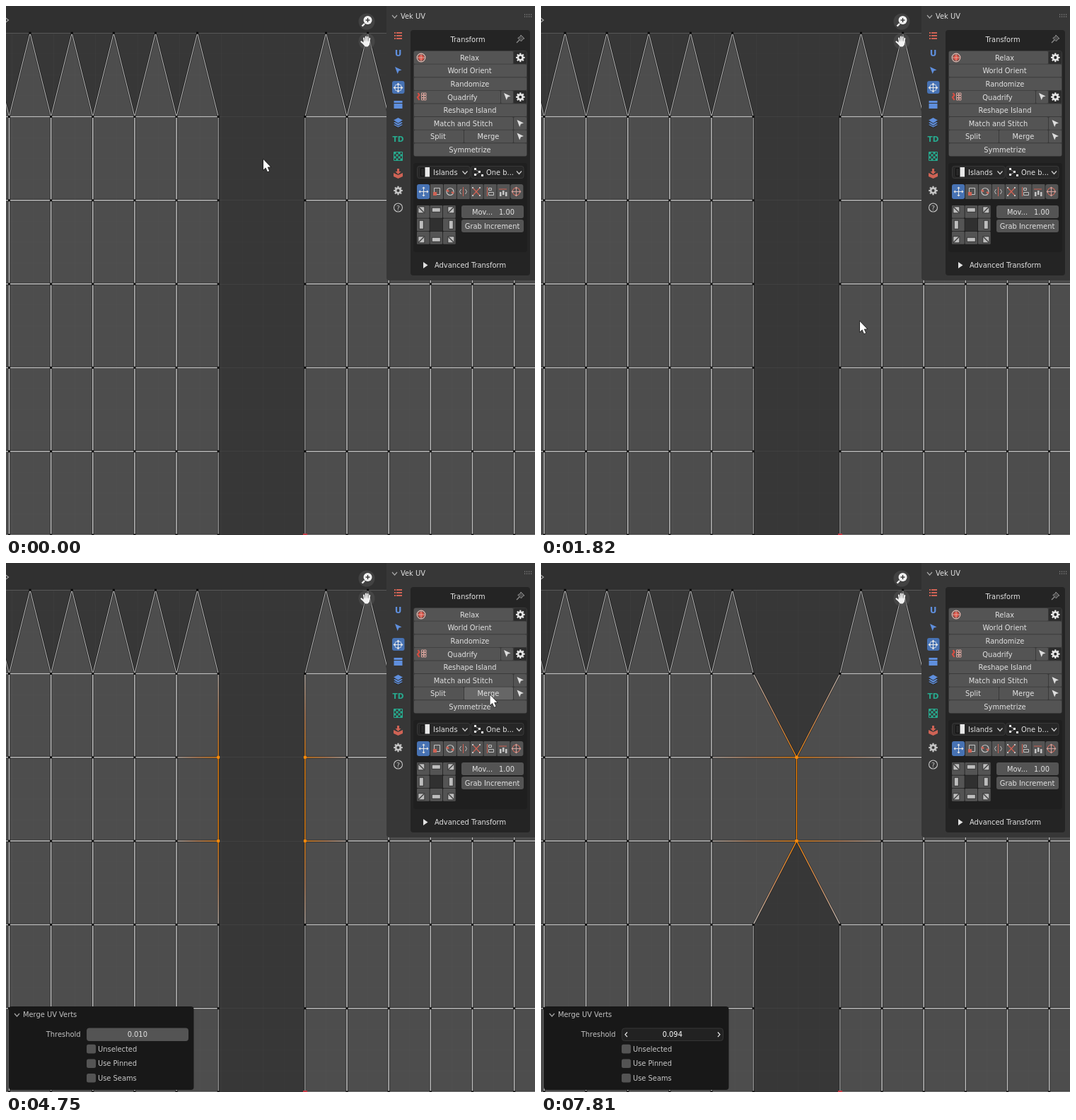
An HTML page with a canvas for the animation above (8000 ms loop, 748 by 748 pixels).

```html
<!DOCTYPE html>
<html lang="en">
<head>
<meta charset="utf-8">
<title>Merging UV vertices</title>
<style>
html, body { margin: 0; width: 100%; height: 100%; overflow: hidden; background: #303030; }
canvas { display: block; width: 748px; height: 748px; }
</style>
</head>
<body>
<canvas id="stage" width="748" height="748"></canvas>
<script>
const ctx = document.getElementById('stage').getContext('2d');
const LOOP = 8000, TICK = 76.667;
const GREY = '#545454', HOVER = '#666666', BLUE = '#4772b3', TEXT = '#e2e2e2';
const ICON = '#c4c4c4', RED = '#cf6355', SKY = '#5f8fdd', TEAL = '#27ab8f', ORANGE = '#ff8c0a';

// Pointer keys: tick, x, y
const PATH = [
  [1, 364, 217], [3, 347, 243], [5, 315, 272], [7, 284, 265], [9, 269.5, 244], [12, 269.5, 244],
  [14, 301, 292], [16, 353, 363], [18, 399.5, 415], [20, 431, 438], [22, 443, 443],
  [24, 451, 446], [36, 451, 446], [37, 465.5, 409.5], [39, 514, 352], [41, 590, 264],
  [43, 638, 206], [45, 655.5, 185], [47, 670, 184.5], [49, 684, 184.5], [61, 684, 185],
  [62, 684.5, 186.5], [64, 627, 250], [66, 475, 418], [68, 349, 542], [69, 329, 560],
  [71, 329, 560], [73, 296, 590], [75, 236, 636], [77, 195, 659], [80, 186, 666]
];

function pointerAt(tick) {
  if (tick <= PATH[0][0]) return PATH[0].slice(1);
  for (let i = 1; i < PATH.length; i++) {
    const [t1, x1, y1] = PATH[i], [t0, x0, y0] = PATH[i - 1];
    if (tick <= t1) {
      const p = (tick - t0) / (t1 - t0);
      return [x0 + (x1 - x0) * p, y0 + (y1 - y0) * p];
    }
  }
  return PATH[PATH.length - 1].slice(1);
}

function rect(x, y, w, h, color, r = 0) {
  ctx.fillStyle = color;
  ctx.beginPath();
  ctx.roundRect(x, y, w, h, r);
  ctx.fill();
}
function frame(x, y, w, h, color, r = 0) {
  ctx.strokeStyle = color;
  ctx.lineWidth = 1;
  ctx.beginPath();
  ctx.roundRect(x, y, w, h, r);
  ctx.stroke();
}
function trace(pts) {
  ctx.beginPath();
  for (let i = 0; i < pts.length; i += 2) ctx.lineTo(pts[i], pts[i + 1]);
}
function line(pts, color, width = 1) {
  trace(pts);
  ctx.strokeStyle = color;
  ctx.lineWidth = width;
  ctx.stroke();
}
function poly(pts, color) {
  trace(pts);
  ctx.fillStyle = color;
  ctx.fill();
}
function disc(x, y, r, color) {
  ctx.beginPath();
  ctx.arc(x, y, r, 0, 7);
  ctx.fillStyle = color;
  ctx.fill();
}
function ring(x, y, r, color, width = 1) {
  ctx.beginPath();
  ctx.arc(x, y, r, 0, 7);
  ctx.strokeStyle = color;
  ctx.lineWidth = width;
  ctx.stroke();
}
function label(text, x, y, align = 'center', color = TEXT, font = '9.9px') {
  ctx.font = font + ' "DejaVu Sans", sans-serif';
  ctx.textAlign = align;
  ctx.fillStyle = color;
  ctx.fillText(text, x, y);
}
function at(x, y, draw) {
  ctx.save();
  ctx.translate(x, y);
  draw();
  ctx.restore();
}
const chevron = (x, y, color = '#a5a5a5') => line([x - 3.5, y - 2, x, y + 2, x + 3.5, y - 2], color, 1.2);

// --- UV mesh ---
const COL = 59.15, ROW = 118.3, TOP = 38.2, COLS = 6, LAST = 5;
const snap = v => Math.floor(v) + 0.5;

function backdrop() {
  rect(0, 0, 748, 748, '#303030');
  rect(0, 38, 748, 710, '#373737');
  for (let i = 0; i < 26; i++) {
    const x = snap(8.5 + i * 29.6), y = snap(TOP + i * ROW / 4);
    line([x, 38, x, 748], `rgba(255,255,255,${i % 2 ? 0.012 : 0.025})`);
    line([0, y, 748, y], `rgba(255,255,255,${i % 4 ? 0.012 : 0.045})`);
  }
  line([0, 38.5, 748, 38.5], '#575757');
}

function island(inner, dir, selected, merged) {
  const vert = (i, r) => {
    const active = i === 0 && (r === 1 || r === 2);
    return { x: active && merged ? 361.5 : inner + dir * i * COL, y: TOP + (r + 1) * ROW, sel: active && selected };
  };
  const outline = [], edges = [], dots = [];
  const addEdge = (a, b, width) => edges.push({ a, b, width });
  for (let r = LAST; r >= 0; r--) { const v = vert(0, r); outline.push(v.x, v.y); }
  for (let i = 0; i < COLS; i++) {
    const tip = { x: inner + dir * (i + 0.5) * COL, y: TOP }, base = vert(i + 1, 0);
    outline.push(tip.x, tip.y, base.x, base.y);
    addEdge(vert(i, 0), tip, 1);
    addEdge(tip, base, 1);
    dots.push(tip);
  }
  outline.push(vert(COLS, LAST).x, 748);
  poly(outline, 'rgba(255,255,255,0.108)');

  // Edges shared by two faces are drawn heavier.
  for (let r = 0; r <= LAST; r++) {
    for (let i = 0; i <= COLS; i++) {
      if (i < COLS) addEdge(vert(i, r), vert(i + 1, r), r < LAST ? 1.5 : 1);
      if (r < LAST) addEdge(vert(i, r), vert(i, r + 1), i ? 1.5 : 1);
      dots.push(vert(i, r));
    }
  }
  for (const { a, b, width } of edges) line([a.x, a.y, b.x, b.y], 'rgba(0,0,0,0.4)', width + 1.7);
  for (const { a, b, width } of edges) {
    let color = '#bebebe';
    if (a.sel || b.sel) {
      color = ctx.createLinearGradient(a.x, a.y, b.x, b.y);
      color.addColorStop(0, a.sel ? ORANGE : '#c6c0bc');
      if (a.sel !== b.sel) color.addColorStop(0.5, '#d9935f');
      color.addColorStop(1, b.sel ? ORANGE : '#c6c0bc');
    }
    line([a.x, a.y, b.x, b.y], color, a.sel || b.sel ? 1.2 : width);
  }
  for (const v of dots) {
    const s = v.sel ? 4 : 3;
    rect(v.x - s / 2, v.y - s / 2, s, s, v.sel ? ORANGE : '#080808', v.sel ? 1 : 0);
  }
}

function viewButtons() {
  line([-1, 16.5, 3.5, 20, -1, 23.5], '#a8a8a8', 1.2);
  disc(510, 22, 11.5, 'rgba(84,84,84,0.5)');
  line([507, 25, 503.5, 28.5], '#f2f2f2', 2.4);
  disc(511.5, 20, 6, '#f2f2f2');
  line([508.5, 20, 514.5, 20], '#333', 1.4);
  line([511.5, 17, 511.5, 23], '#333', 1.4);
  disc(510, 50, 11.5, 'rgba(84,84,84,0.5)');
  ctx.lineCap = 'round';
  for (const [x, y] of [[506, 45.5], [508.8, 43.6], [511.6, 44], [514.3, 46]]) line([x, y, x * 0.7 + 153, 52], '#f2f2f2', 2);
  line([502.5, 50.5, 507, 54.5], '#f2f2f2', 2.2);
  ctx.lineCap = 'butt';
  poly([505.5, 50, 514.8, 50, 513.8, 55, 511.5, 57.5, 508, 57.5, 505, 54], '#f2f2f2');
}

// --- icons ---
function gear(x, y, color = '#e6e6e6') {
  ring(x, y, 3.4, color, 2.7);
  for (let i = 0; i < 8; i++) {
    const c = Math.cos(i * Math.PI / 4), s = Math.sin(i * Math.PI / 4);
    line([x + c * 4, y + s * 4, x + c * 6.3, y + s * 6.3], color, 2.2);
  }
}
function pick(x, y, color = '#dedede') {
  poly([x - 4.5, y - 5, x + 5, y - 0.5, x + 1, y + 0.8, x - 0.8, y + 5], color);
}
function moveCross(x, y, color = '#e4e4e4') {
  line([x - 6, y, x + 6, y], color);
  line([x, y - 6, x, y + 6], color);
  for (let i = 0; i < 4; i++) at(x, y, () => {
    ctx.rotate(i * Math.PI / 2);
    poly([7, 0, 4.5, -2.2, 4.5, 2.2], color);
  });
}

function tabs() {
  for (const y of [38, 42, 46]) {
    rect(549, y - 1, 2, 2, RED);
    rect(552, y - 1, 8, 2, RED);
  }
  label('U', 554.5, 71, 'center', SKY, 'bold 12px');
  pick(554.5, 91, SKY);
  rect(546, 106, 17.5, 18, BLUE, 3);
  frame(550.5, 111.5, 8, 8, '#a9bedd');
  moveCross(554.5, 115.5);
  rect(548.5, 134, 12, 3, SKY);
  rect(548.5, 138, 12, 7, SKY);
  for (const y of [168, 165, 161.5]) {
    poly([548, y, 554.5, y - 3.5, 561, y, 554.5, y + 3.5], SKY);
    line([548, y + 1, 554.5, y + 4.5, 561, y + 1], '#2d2d2d');
  }
  label('TD', 554.5, 192, 'center', TEAL, 'bold 10.5px');
  frame(548.5, 206.5, 12, 12, TEAL);
  for (let i = 0; i < 16; i++)
    if ((i + (i >> 2)) % 2 === 0) rect(548.5 + i % 4 * 3, 206.5 + (i >> 2) * 3, 3, 3, TEAL);
  poly([548, 236, 554.5, 239, 561, 236, 561, 241, 554.5, 244, 548, 241], RED);
  rect(553, 230, 3, 5, RED);
  poly([550.5, 234, 558.5, 234, 554.5, 238], RED);
  gear(554.5, 261, ICON);
  ring(554.5, 285, 6, ICON, 1.1);
  label('?', 554.5, 288.6, 'center', ICON, '9.5px');
}

// --- side panel ---
const rowTop = i => 64 + i * 18.6;
function button(x0, x1, row, text, textX, color = GREY) {
  rect(x0, rowTop(row), x1 - x0, 17.7, color, 1.5);
  if (text) label(text, textX, rowTop(row) + 12.8);
}

function operators(hover, pressed) {
  const tint = name => pressed === name ? BLUE : hover === name ? HOVER : GREY;
  rect(576, 63, 161, 150, '#3a3a3a', 4);
  button(577, 717, 0, 'Relax', 655.5);
  button(577, 736, 1, 'World Orient', 655.5);
  button(577, 736, 2, 'Randomize', 656);
  button(577, 699, 3, 'Quadrify', 645.5);
  button(577, 736, 4, 'Reshape Island', 656);
  button(577, 717, 5, 'Match and Stitch', 646.5);
  button(577, 647, 6, 'Split', 611);
  button(648, 717, 6, 'Merge', 682, tint('merge'));
  button(577, 736, 7, 'Symmetrize', 656, tint('symmetrize'));
  for (const r of [0, 3]) {
    button(718, 736, r, '', 0, '#2c2c2c');
    gear(727.3, rowTop(r) + 8.9);
  }
  for (const r of [5, 6]) button(718, 736, r);
  button(700, 717, 3);
  for (const [x, y] of [[708.5, 128], [727, 166], [727, 184.5]]) pick(x, y);
  ring(587, 73, 5.8, '#e9b9b0', 1.2);
  disc(587, 73, 4.2, '#d54d41');
  line([582, 73, 592, 73], '#e9b9b0', 0.8);
  line([587, 68, 587, 78], '#e9b9b0', 0.8);
  line([582.5, 123, 584.5, 126, 582, 129, 584.5, 133], '#d54d41', 2.2);
  for (let i = 0; i < 6; i++) frame(587.5 + i % 2 * 3.5, 123 + (i >> 1) * 3.5, 3, 3, '#d8a49c');
}

function anchorGrid() {
  for (let i = 0; i < 9; i++) {
    const c = i % 3, r = Math.floor(i / 3), x = 581 + c * 18.5, y = 282 + r * 18.5;
    rect(x, y, 17.7, 17.7, i === 4 ? '#303030' : GREY, 1);
    if (i === 4) continue;
    const mx = x + 8.8 + (c - 1) * 2.5, my = y + 8.8 + (r - 1) * 2.5;
    const w = c === 1 ? 11 : r === 1 ? 5 : 8, h = r === 1 ? 11 : c === 1 ? 5 : 8;
    rect(mx - w / 2 - 1, my - h / 2 - 1, w + 2, h + 2, '#383838');
    rect(mx - w / 2, my - h / 2, w, h, '#bebebe');
    if (c !== 1 && r !== 1) {
      const slope = c === r ? -4 : 4;
      line([mx - 4, my + slope * -1 * -1, mx + 4, my - slope], '#444', 1.5);
    }
  }
}

function transformTools() {
  rect(576, 222, 161, 126, '#1f1f1f', 4);
  for (const x of [581.5, 657.5]) {
    rect(x, 226, 74.5, 18, '#272727', 3);
    frame(x, 226.5, 74.5, 17, '#383838', 3);
  }
  frame(586.5, 229.5, 5, 11, '#101010');
  rect(592.5, 228, 6.5, 13.5, '#e8e8e8');
  label('Islands', 604, 238.5, 'left');
  line([664, 231, 669, 235, 664, 239], '#8c8c8c');
  for (const [x, y] of [[662, 229], [668, 233], [672, 238], [662, 237]]) rect(x, y, 3, 3, '#e6e6e6');
  label('One b...', 679, 238.5, 'left');
  chevron(649, 235.5, '#d0d0d0');
  chevron(725.5, 235.5, '#d0d0d0');

  for (let i = 0; i < 8; i++) rect(581 + i * 18.9, 252, 18.1, 21, i ? GREY : BLUE, i % 7 ? 1 : 3);
  moveCross(590.5, 262.5);
  frame(605.5, 257.5, 8, 9, ICON);
  rect(604, 263, 5, 5, RED);
  ring(628, 262.5, 5, ICON, 1.2);
  line([623, 260, 626, 262.5], RED, 2.5);
  line([630, 263, 633, 265], RED, 2.5);
  line([646.5, 256, 646.5, 269], RED);
  line([643.5, 259, 641.5, 262.5, 643.5, 266], ICON);
  line([649.5, 259, 651.5, 262.5, 649.5, 266], ICON);
  line([660, 257, 670, 268], RED, 1.2);
  line([670, 257, 660, 268], RED, 1.2);
  for (const [x, y] of [[660, 257], [670, 257], [660, 268], [670, 268]]) rect(x - 1, y - 1, 2, 2, ICON);
  line([680.5, 256, 680.5, 269], RED);
  frame(682.5, 257.5, 4, 3, ICON);
  frame(682.5, 263.5, 7, 4, ICON);
  line([697, 259, 708, 259], RED);
  for (let i = 0; i < 3; i++) rect(698 + i * 4, 263 - (i === 1 ? 2 : 0), 2.5, 6, ICON);
  ring(721.5, 262.3, 5.3, RED, 1.1);
  moveCross(721.5, 262.5, '#d2a09a');

  anchorGrid();
  rect(644, 282, 88, 18, GREY, 3);
  label('Mov...', 659, 294.5, 'left');
  label('1.00', 719, 294.5, 'right');
  rect(644, 302, 88, 18, GREY, 3);
  label('Grab Increment', 687.5, 314.5);
}

function sidePanel(hover, pressed) {
  rect(538, 0, 210, 388, '#373737', [0, 0, 0, 4]);
  rect(572, 34, 169, 347, '#242424', 4);
  chevron(549.5, 15);
  label('Vek UV', 558, 18, 'left');
  for (let i = 0; i < 8; i++) rect(733 + i % 4 * 3, 11.5 + (i >> 2) * 3, 1.2, 1.2, '#8a8a8a');
  label('Transform', 653, 50.5);
  const pin = [728, 41, 733, 46, 731, 46.6, 728.5, 50, 723.8, 45.3, 727.4, 43, 728, 41];
  poly(pin, '#474747');
  line(pin, '#8f8f8f');
  line([726, 48, 722, 52], '#8f8f8f', 1.2);
  tabs();
  operators(hover, pressed);
  transformTools();
  poly([590, 362, 596.5, 366.5, 590, 371], TEXT);
  label('Advanced Transform', 606, 370, 'left');
}

function redoPanel(value, mode) {
  rect(4, 627, 261.5, 118, '#181818', 4);
  chevron(15.5, 639);
  label('Merge UV Verts', 24, 642.3, 'left', '#c2c2c2');
  label('Threshold', 105.5, 670.3, 'right', '#c2c2c2');
  rect(114, 657.5, 144, 18.5, { idle: GREY, hover: '#626262', drag: '#222222' }[mode], 4);
  if (mode === 'drag') frame(114.5, 658, 143, 17.5, '#343434', 4);
  if (mode !== 'idle') {
    line([122, 663.5, 119, 666.8, 122, 670], '#e8e8e8', 1.2);
    line([250, 663.5, 253, 666.8, 250, 670], '#e8e8e8', 1.2);
  }
  label(value.toFixed(3), 185.8, 670.3, 'center', mode === 'drag' ? '#ffffff' : TEXT);
  ['Unselected', 'Use Pinned', 'Use Seams'].forEach((text, i) => {
    const y = 687 + i * 20.6;
    rect(114, y - 6.2, 13, 12.6, GREY, 2.5);
    label(text, 130, y + 3.8, 'left', '#c8c8c8');
  });
}

// --- pointer ---
function arrow(x, y) {
  at(x, y, () => {
    trace([0, 0, 0, 14.6, 3.3, 11.6, 5.8, 17.3, 8.2, 16.2, 5.7, 10.8, 10, 10.4]);
    ctx.closePath();
    ctx.fillStyle = '#ffffff';
    ctx.strokeStyle = '#151515';
    ctx.lineWidth = 1.2;
    ctx.stroke();
    ctx.fill();
  });
}
function resizer(x, y) {
  for (const [color, w, grow] of [['#111', 3.6, 1], ['#fff', 1.7, 0]]) {
    line([x - 6, y, x + 6, y], color, w);
    for (const d of [-1, 1])
      poly([x + d * (9.5 + grow), y, x + d * (5 - grow), y - 4 - grow, x + d * (5 - grow), y + 4 + grow], color);
  }
}

function marquee(x, y) {
  const x0 = 269.5, y0 = 243.5, w = Math.round(x - 3 - x0), h = Math.round(y - 4 - y0);
  rect(x0, y0, w, h, 'rgba(255,255,255,0.055)');
  frame(x0, y0, w, h, 'rgba(0,0,0,0.3)');
  ctx.setLineDash([4, 3]);
  frame(x0, y0, w, h, '#f4f4f4');
  ctx.setLineDash([]);
}

function threshold(tick) {
  if (tick < 87) return 0.010;
  if (tick >= 102) return 0.094;
  if (tick >= 98) return 0.093;
  return 0.010 + 0.082 * Math.sin(Math.PI / 2 * Math.min(1, (tick - 86) / 11));
}

function render(ms) {
  const tick = Math.floor((ms + 21) / TICK);
  const within = (a, b) => tick >= a && tick <= b;
  const [x, y] = pointerAt(tick);
  const value = threshold(tick), merged = value > 0.0864, selected = tick >= 29;

  backdrop();
  island(300.2, -1, selected, merged);
  island(422.9, 1, selected, merged);
  rect(420, 746, 6, 2, '#c43a45');
  viewButtons();

  let hover = '';
  if (x > 577 && x < 736 && y > 194 && y < 212) hover = 'symmetrize';
  if (x > 648 && x < 717 && y > 175 && y < 194) hover = 'merge';
  sidePanel(hover, within(53, 54) ? 'merge' : '');
  if (tick >= 55) redoPanel(value, tick >= 83 ? 'drag' : tick >= 78 ? 'hover' : 'idle');

  if (within(13, 22)) marquee(x, y);
  if (within(12, 22) || within(53, 54)) disc(x, y, 11, 'rgba(170,168,22,0.82)');
  if (tick < 77) arrow(x, y);
  else if (tick < 83) resizer(x, y);
}

const start = performance.now();
function loop() {
  render((performance.now() - start) % LOOP);
  requestAnimationFrame(loop);
}
loop();
</script>
</body>
</html>
```
